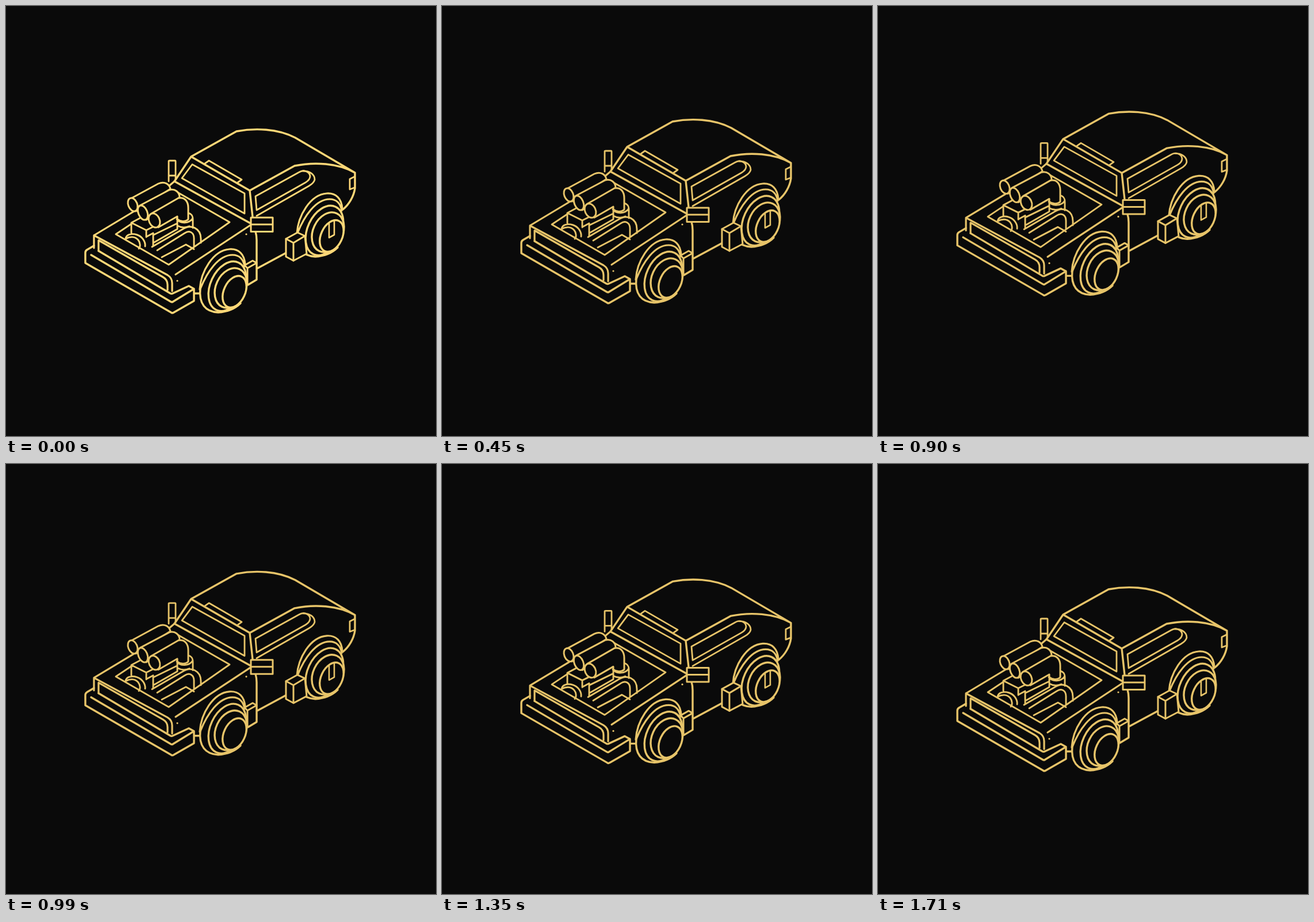
Animation of 748 by 748 pixels, one loop 1800 ms. Source, as an HTML page with a canvas:

```html
<!DOCTYPE html>
<html lang="en">
<head>
<meta charset="utf-8">
<title>Bouncing car</title>
<style>
html, body { margin: 0; width: 100%; height: 100%; overflow: hidden; background: #0a0a0a; }
canvas { display: block; width: 748px; height: 748px; }
</style>
</head>
<body>
<canvas id="stage" width="748" height="748"></canvas>
<script>
const SIZE = 748, STEP = 90, STEPS = 20, RISE = 3.4;
const BACK = '#0a0a0a', BRIGHT = '#fdd777', SOFT = '#e7c469';
const canvas = document.getElementById('stage');
const ctx = canvas.getContext('2d');

const path = d => new Path2D(d);

function ellipse(x, y, rx, ry, tilt) {
  const p = new Path2D();
  p.ellipse(x, y, rx, ry, tilt * Math.PI / 180, 0, Math.PI * 2);
  return p;
}

const body = path(`
  M322 262 L401 218 C433 212 472 213 503 229 L607 290 V317 C605 331 597 345 586 354
  M424 321 L502 278 C536 271 578 273 607 290
  M428 379.5 L293 305 L322 262 L424 321 L429 367
  M428 379 C433 387 436 396 436 407 V476 L421 485
  M436 457 L488 429`);

const trim = path(`
  M324 275.5 L415 326 V361 L306 299.5 Z
  M346 274 L353 269 L410 302 L403 307
  M606 297 L598 301 V319 L606 316
  M434 331 L510 289 C518 284 528 288 529 296 C529 301 526 304 521 307 L436 355 Z
  M516 287 C529 287 537 293 537 302 C536 307 532 310 527 313 L436 365
  M283 305 V270 Q283 269 285 269 H294 Q295 269 295 270 V302 M283 295 H295`);

const hood = path(`
  M153 421 V399 L228 354 M279 317 L293 305 M295 467 L427 380
  M153 399 L281 468 Q289 473 289 482 V496
  M161 426 V407.5 L273 471.5 Q281 476 281 485 V494`);

const bumper = path(`
  M153 417 L141 424 Q138 426 138 429 V447 L287 533 Q289 535 292 533 L327 513 V492
  L318 487 L290 500 Q288 501 286 500 L161 426
  M148 433 L286 514 Q289 516 291 514 L327 492 M327 500 H337`);

const bay = path(`
  M218 379 L191 397 L283 450 L389 376 L300 325
  M254 419 L306 389 C322 378 339 387 339 405 V412
  M263 425 L311 395 C320 389 327 395 327 404 V418
  M271 437 L313 415 L327 423`);

const block = path(`
  M218 395 V377 L233 369 M218 377 L244 390 L258 383 M244 390 V402
  M245 401 L256 395 V417 M257 398 L298 378 M298 366 V388 L258 411
  M297 371 C303 379 319 379 325 369 M317 360 C324 362 325 366 325 371 V386
  M298 382 C305 386 312 386 319 383
  M208 405 C209 397 219 395 228 398 C237 401 243 410 242 418
  M208 405 C215 401 224 400 230 407 C234 412 234 419 231 422`);

// Each intake: tube outline, then its open mouth.
const intakes = [
  path('M217 335 L265 309 C276 304 284 310 286 318 L226 357 Z'),
  ellipse(220.5, 345.5, 7.8, 12, -22),
  path('M233 347 L284 320 C294 317 302 324 302 333 L244 372 Z'),
  ellipse(238, 359.5, 7.8, 13.2, -22),
  path('M253 361 L300 334 C311 332 317 340 317 351 V371 C312 376 303 375 298 371 V366 L265 385 Z'),
  ellipse(258, 373, 9.2, 12.8, -25)
];

const sideBox = path('M420 456 V483 M415 451 L429 443 L436 447 M415 451 L420 456 L436 447');
const rearBox = path('M487 405 L507 394 L520 400 L523 431 L500 443 L487 436 Z');
const rearBoxEdges = path('M487 405 L500 412 V443 M500 412 L520 400');
const mirror = path('M426 368 H464 V392.5 H426 Z M426 380 H464');

const arches = path(`
  M337 493 C339 462 360 425 389 423 C405 422 415 432 416 450
  M338 492 C350 462 370 433 394 433 C406 433 413 441 415 453`);
const tyre = path('M338 491 C335 518 347 532 369 533 C385 532 399 526 408 517');
const discs = [
  ellipse(385, 487.5, 29.4, 45.5, 25),
  ellipse(391, 490.5, 25.9, 36.1, 25),
  ellipse(397.5, 497, 18.5, 29, 25)
];
const slot = path('M562 377 V403 L571 398 V373');

function line(p, width = 3.2) {
  ctx.lineWidth = width;
  ctx.stroke(p);
}

function solid(p, width) {
  ctx.fill(p);
  line(p, width);
}

function wheel(dx, dy) {
  ctx.save();
  ctx.translate(dx, dy);
  line(arches);
  line(tyre, 3.4);
  discs.forEach(p => solid(p, 3.4));
  ctx.restore();
}

function dot(x, y) {
  ctx.beginPath();
  ctx.arc(x, y, 1.6, 0, Math.PI * 2);
  ctx.fill();
}

function draw(step) {
  const lift = RISE * Math.min(step, STEPS - 1 - step);
  const ink = step < 4 ? BRIGHT : SOFT;
  ctx.fillStyle = BACK;
  ctx.fillRect(0, 0, SIZE, SIZE);
  ctx.save();
  ctx.translate(0, -lift);
  ctx.strokeStyle = ink;
  ctx.lineCap = ctx.lineJoin = 'round';
  line(body, 3.4);
  line(trim, 2.8);
  line(hood);
  line(bumper, 3.4);
  line(bay, 2.9);
  line(block, 2.9);
  intakes.forEach(p => solid(p, 3));
  line(sideBox, 3);
  wheel(0, 0);
  wheel(169, -97);
  line(slot, 2.6);
  solid(rearBox, 3);
  line(rearBoxEdges, 3);
  solid(mirror, 3);
  ctx.fillStyle = ink;
  dot(418, 397);
  dot(298, 478);
  ctx.restore();
}

const start = performance.now();
function tick() {
  const t = Math.max(0, performance.now() - start);
  draw(Math.floor(t / STEP) % STEPS);
  requestAnimationFrame(tick);
}
tick();
</script>
</body>
</html>
```
